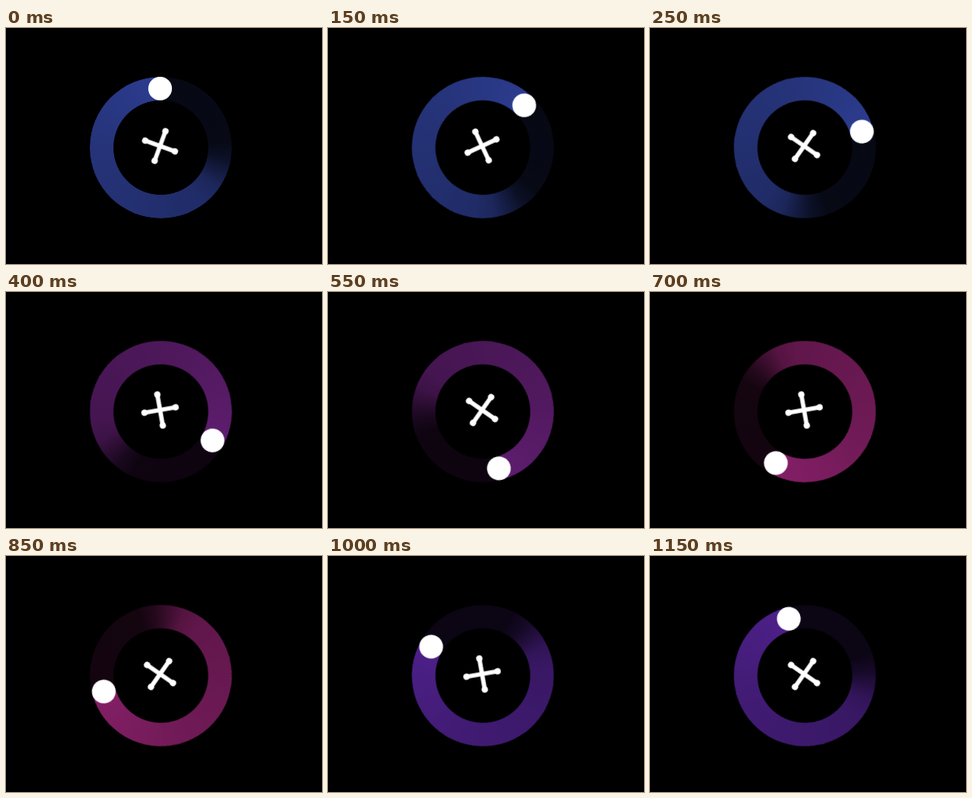
Animation, 400 px wide and 300 px high, one loop 1200 ms. Source, as an HTML page:

```html
<!DOCTYPE html>
<html lang="en">
<head>
<meta charset="utf-8">
<title>Loader</title>
<style>
  html, body {
    margin: 0;
    width: 100%;
    height: 100%;
    overflow: hidden;
    background: #000;
  }

  .stage {
    position: relative;
    width: 400px;
    height: 300px;
    overflow: hidden;
  }

  .ring, .orbit {
    position: absolute;
    left: 105.5px;
    top: 62px;
    width: 180px;
    height: 180px;
    border-radius: 50%;
    animation: spin 1.2s steps(24) infinite;
  }

  /* tail fades behind the ball; the tint switches every quarter turn */
  .ring {
    color: #2c3c8e;
    background: conic-gradient(
      rgba(0, 0, 0, .86) 0deg,
      rgba(0, 0, 0, .85) 85deg,
      rgba(0, 0, 0, .72) 100deg,
      rgba(0, 0, 0, .36) 125deg,
      rgba(0, 0, 0, .27) 142deg,
      rgba(0, 0, 0, .23) 180deg,
      rgba(0, 0, 0, .15) 270deg,
      rgba(0, 0, 0, 0) 360deg) currentColor;
    -webkit-mask: radial-gradient(circle, transparent 59.6px, #000 60.4px);
    mask: radial-gradient(circle, transparent 59.6px, #000 60.4px);
    animation: spin 1.2s steps(24) infinite, tint 1.2s step-end infinite;
  }

  .ball {
    position: absolute;
    left: 75px;
    top: 0;
    width: 30px;
    height: 30px;
    border-radius: 50%;
    background: #fff;
    transform: rotate(-.7deg);
    transform-origin: 15px 90px;
  }

  svg {
    position: absolute;
    left: 165px;
    top: 120px;
    width: 60px;
    height: 60px;
    animation: spin 1.2s steps(24) infinite reverse;
    animation-name: unspin;
    animation-direction: normal;
  }

  @keyframes spin { to { transform: rotate(360deg); } }
  @keyframes unspin {
    from { transform: rotate(20deg); }
    to { transform: rotate(-340deg); }
  }
  @keyframes tint {
    0% { color: #2c3c8e; }
    25% { color: #5e1d6e; }
    50% { color: #841f66; }
    75% { color: #4d2089; }
  }
</style>
</head>
<body>
<div class="stage">
  <div class="ring"></div>
  <div class="orbit"><div class="ball"></div></div>
  <svg viewBox="-30 -30 60 60" fill="#fff" stroke="#fff">
    <path d="M-20 0H20M0-20V20" stroke-width="5.4"/>
    <g stroke="none">
      <circle cx="-20" r="4"/>
      <circle cx="20" r="4"/>
      <circle cy="-20" r="4"/>
      <circle cy="20" r="4"/>
    </g>
  </svg>
</div>
</body>
</html>
```
